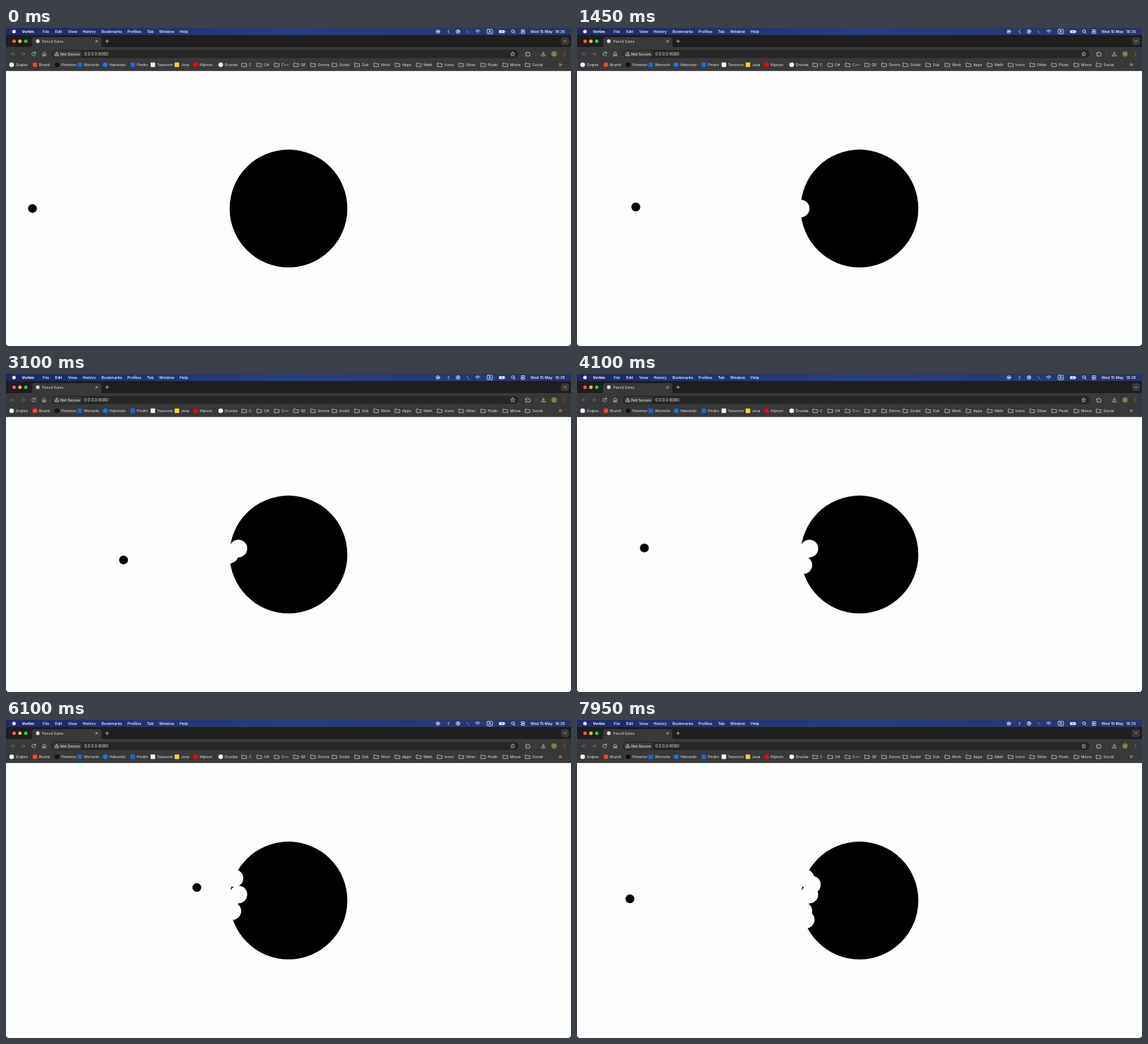
Animation of 800 by 450 pixels, one loop 8 s. Source, as an HTML page:

```html
<!DOCTYPE html>
<html lang="en">
<head>
<meta charset="utf-8">
<title>Pencil Sums</title>
<style>
  html, body { margin: 0; width: 100%; height: 100%; overflow: hidden; background: #000; }
  svg { display: block; width: 800px; height: 450px; }
  text { font-family: Inter, "Open Sans", sans-serif; font-size: 5.2px; fill: #e6e4e8; white-space: pre; }
  #menu text { font-size: 5.4px; font-weight: 500; fill: #fff; }
  .line { fill: none; stroke: #d2d0d4; stroke-width: .75; stroke-linecap: round; stroke-linejoin: round; }
  .dim { stroke: #77757a; }
  .white { stroke: #fff; }
</style>
</head>
<body>
<svg viewBox="0 0 800 450">
  <defs>
    <linearGradient id="sky">
      <stop offset="0" stop-color="#1d2a66"/>
      <stop offset=".5" stop-color="#263f7d"/>
      <stop offset="1" stop-color="#26356b"/>
    </linearGradient>
    <mask id="bitten" maskUnits="userSpaceOnUse" x="300" y="160" width="200" height="190">
      <rect x="300" y="160" width="200" height="190" fill="#fff"/>
      <g id="bites"></g>
    </mask>
  </defs>

  <path fill="#fdfcff" d="M0 60H800V446a4 4 0 0 1-4 4H4a4 4 0 0 1-4-4z"/>
  <circle cx="400" cy="255.4" r="83.33" mask="url(#bitten)"/>
  <circle id="ball" r="6.25"/>

  <rect width="800" height="10.5" fill="url(#sky)"/>
  <g id="menu">
    <circle cx="11.3" cy="5" r="2.5" fill="#fff"/>
    <g class="line white">
      <circle cx="611.5" cy="5" r="2.5"/>
      <path d="M627.3 3l-1.6 2 1.6 2"/>
      <circle cx="640" cy="5" r="2.6"/>
      <path d="M639.3 3.8v2.4l2-1.2z"/>
      <path d="M652.3 3l3 4" opacity=".6"/>
      <path d="M664.7 3.9q3.2-2.6 6.4 0M666.1 5.4q1.8-1.4 3.6 0M667.9 6.9v.1"/>
      <rect x="681.2" y="2" width="7.6" height="6.2" rx="1.2"/>
      <circle cx="717.8" cy="4.5" r="2"/>
      <path d="M719.3 6l1.7 1.7"/>
      <rect x="729.3" y="2.5" width="5.4" height="2" rx="1"/>
      <rect x="729.3" y="5.7" width="5.4" height="2" rx="1"/>
    </g>
    <rect x="610.5" y="4" width="2" height="2" fill="#fff"/>
    <rect x="698" y="2.9" width="8.2" height="4.3" rx="1.2" fill="#d8dcec"/>
    <path d="M702.7 3.4l-1.7 2h1.5l-.8 1.5 1.8-2.1H702z" fill="#2b3c72"/>
    <rect x="706.7" y="4.2" width=".6" height="1.7" fill="#d8dcec"/>
  </g>

  <rect y="10.3" width="800" height="17" fill="#1f1d20"/>
  <rect y="27" width="800" height="33.8" fill="#3a383b"/>
  <path fill="#3a383b" d="M33.5 27.5q3.5 0 3.5-3.5v-7.500q0-3.500 3.500-3.500h91q3.500 0 3.500 3.500V24q0 3.500 3.500 3.500z"/>
  <circle cx="11.500" cy="18.800" r="2.500" fill="#ff5f57"/>
  <circle cx="19.700" cy="18.800" r="2.500" fill="#febc2e"/>
  <circle cx="28" cy="18.800" r="2.500" fill="#28c840"/>
  <circle cx="45" cy="18.700" r="2.600" fill="#e4dedf"/>
  <rect x="785.800" y="13.200" width="11.400" height="10.800" rx="3" fill="#3a383b"/>
  <rect x="64.800" y="31" width="661" height="11.400" rx="5.700" fill="#272528"/>
  <rect x="66.500" y="32.200" width="41" height="9" rx="4.500" fill="#3d3b3e"/>
  <rect x="749.700" y="33.500" width=".6" height="6.500" fill="#58565a"/>
  <rect y="60.300" width="800" height=".5" fill="#504e52"/>
  <circle cx="776" cy="36.800" r="3.700" fill="#87803f"/>
  <g class="line">
    <path d="M126.800 17.300l3 3m0-3l-3 3M141 18.700h4.400m-2.200-2.200v4.400"/>
    <path d="M789.800 17.800l1.700 1.700 1.700-1.700"/>
    <path class="dim" d="M12.600 36.800H7.400m2.400-2.400l-2.400 2.400 2.400 2.400M21.400 36.800h5.200m-2.400-2.400l2.400 2.400-2.400 2.400"/>
    <path d="M41.500 35.200a2.600 2.600 0 1 0 .4 2.200M41.900 33.900v1.800h-1.800"/>
    <path d="M51.900 39.400v-3.500l2.200-1.900 2.200 1.900v3.500h-1.500v-1.900h-1.400v1.900z"/>
    <path d="M72 34.200l2.700 4.900h-5.400zM72 36v1.300m0 .9v.1"/>
    <path d="M717.500 33.900l.9 1.900 2 .2-1.500 1.400.4 2.100-1.800-1.100-1.800 1.100.4-2.100-1.500-1.400 2-.2z"/>
    <path d="M736 35.200h1.700q0-1.400 1-1.400t1 1.400h1.700v1.500q1 0 1 .9t-1 .9v1.200H736v-1.500q1.100 0 1.100-.9t-1.100-.8z"/>
    <path d="M760.800 34v3.500m-1.600-1.600l1.600 1.600 1.600-1.600M758.200 38v1.500h5.200V38"/>
    <path d="M790.800 34.700v.01M790.800 36.800v.01M790.800 38.900v.01"/>
    <path d="M783.300 50.400l1.500 1.600-1.500 1.600m2-3.200l1.500 1.600-1.500 1.600"/>
  </g>
  <g id="labels"></g>
</svg>
<script>
const NS = "http://www.w3.org/2000/svg";
const $ = id => document.getElementById(id);

function add(parent, tag, attrs, content = "") {
  const node = document.createElementNS(NS, tag);
  for (const key in attrs) node.setAttribute(key, attrs[key]);
  node.textContent = content;
  parent.append(node);
  return node;
}

const label = (x, y, content, attrs = {}, parent = $("labels")) =>
  add(parent, "text", { x, y, ...attrs }, content);

const menu = [
  [52, "File"], [69.5, "Edit"], [88, "View"], [108.500, "History"], [135.300, "Bookmarks"],
  [172, "Profiles"], [199.500, "Tab"], [217, "Window"], [246, "Help"],
  [683.100, "A"], [742.800, "Wed 15 May"], [777.500, "18:35"]
];
label(22.500, 7, "Vorlim", { style: "font-weight:700" }, $("menu"));
menu.forEach(([x, name]) => label(x, 7, name, {}, $("menu")));

label(51.300, 20.500, "Pencil Sums");
label(77, 38.600, "Not Secure", { "font-weight": 500 });
label(111, 38.700, "0.0.0.0:8080", { style: "font-size:5.6px" });

const sites = [
  [8, "Zoqlee", "#f2f0f3"], [41, "Brumil", "#ff4a1c"], [72.500, "Flemmor", "#111"],
  [104.500, "Wornelin", "#1769c7", 1], [140.500, "Halvondo", "#1877f2"], [179.500, "Pindro", "#1868db", 1],
  [208, "Tasvoom", "#f3f1f4", 1], [242, "Jeva", "#ffd02f", 1], [268.500, "Klipvon", "#f00"],
  [304, "Drunba", "#f4f2f5"]
];
for (const [x, name, fill, square] of sites) {
  if (square) add($("labels"), "rect", { x: x - 3.2, y: 48.800, width: 6.400, height: 6.400, rx: .8, fill });
  else add($("labels"), "circle", { cx: x, cy: 52, r: 3.300, fill });
  label(x + 5.800, 53.800, name);
}

const folders = [
  [344, "C"], [365.300, "C#"], [390, "C++"], [417.300, "QE"], [441.500, "Omvra"], [471.700, "Godot"],
  [503.800, "Zub"], [531, "Work"], [561, "Apps"], [591.200, "Math"], [620.800, "Icons"],
  [651.300, "Other"], [682.300, "Pludo"], [713.800, "Movie"], [745.300, "Social"]
];
for (const [x, name] of folders) {
  add($("labels"), "path", { class: "line", d: `M${x - 9.700} 49.700h2.200l.8.900h3.300v4h-6.300z` });
  label(x, 53.800, name);
}

// Each shot: heading in radians, ticks until it bites the disc.
const shots = [
  [0, 76], [-.0258, 79], [.0465, 77], [-.0967, 78], [-.0676, 80], [.0835, 78], [-.031, Infinity]
];
const SPEED = 800 / 192, START_TICK = 9, LOOP = 8000, STEP = 50, TICKS_PER_STEP = 3;

const place = (heading, ticks) => ({
  cx: SPEED * ticks * Math.cos(heading),
  cy: 255.4 + SPEED * ticks * Math.sin(heading)
});

const bites = shots.slice(0, -1).map(([heading, ticks]) =>
  add($("bites"), "circle", { ...place(heading, ticks), r: 12.5 }));

function render(time) {
  let tick = START_TICK + Math.floor((time % LOOP) / STEP) * TICKS_PER_STEP;
  let current = 0;
  while (tick > shots[current][1]) tick -= shots[current++][1];
  const [heading, hit] = shots[current];
  const { cx, cy } = place(heading, tick);
  $("ball").setAttribute("cx", cx);
  $("ball").setAttribute("cy", cy);
  const eaten = current + (tick === hit ? 1 : 0);
  bites.forEach((bite, i) => bite.setAttribute("visibility", i < eaten ? "visible" : "hidden"));
}

const start = performance.now();
function loop() {
  render(performance.now() - start);
  requestAnimationFrame(loop);
}
loop();
</script>
</body>
</html>
```
